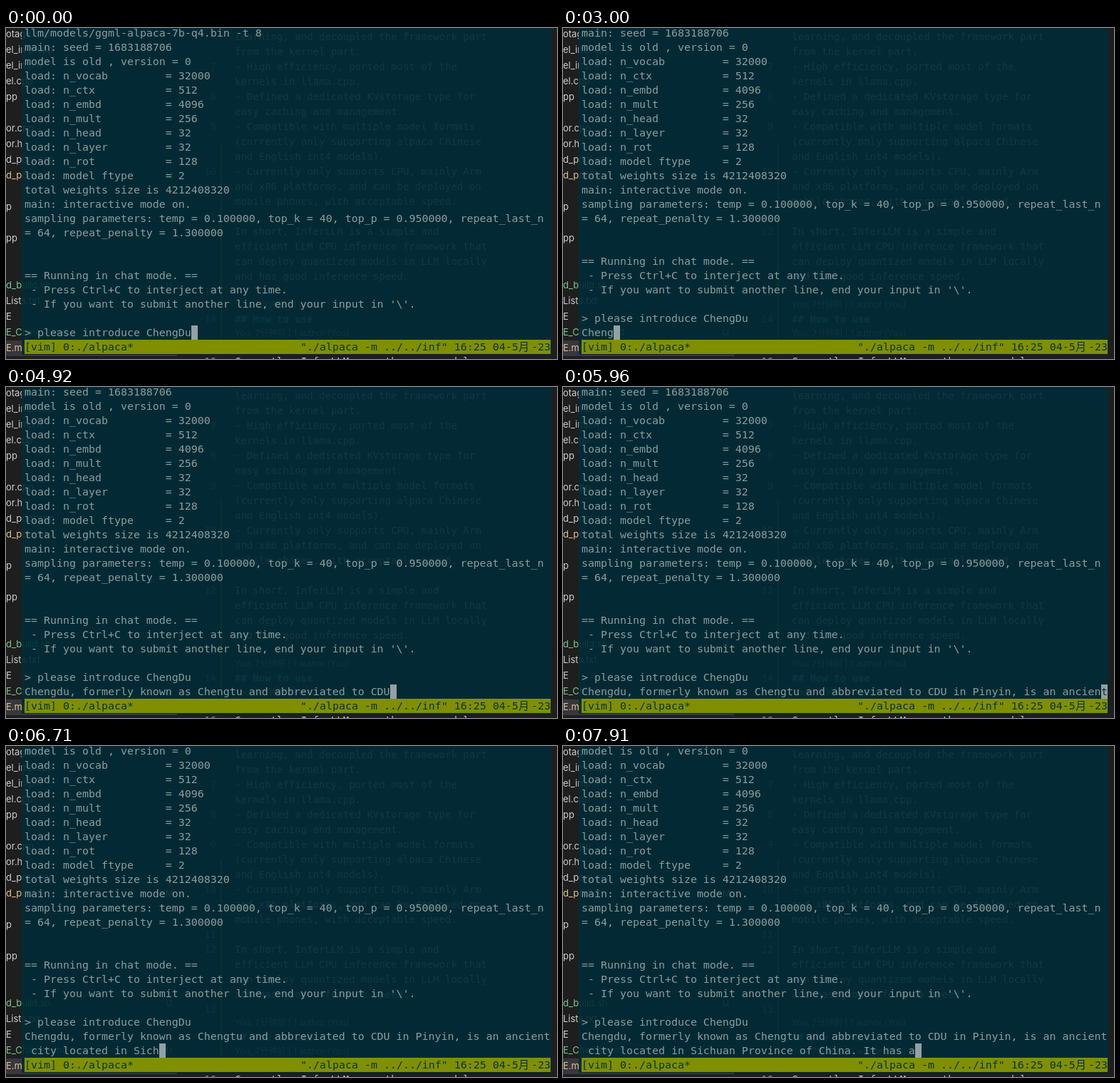
Recreate the animation shown at these times as an HTML page with a canvas. Size 773 px wide and 464 px high, loop 8000 ms.

```html
<!DOCTYPE html>
<html lang="en">
<head>
<meta charset="utf-8">
<style>
html, body { margin: 0; width: 100%; height: 100%; overflow: hidden; background: #1e1e1e; }
canvas { display: block; }
</style>
</head>
<body>
<canvas id="stage" width="773" height="464"></canvas>
<script>
const ctx = document.getElementById("stage").getContext("2d");
const LOOP = 8000, CELL = 9, ROW = 20, LEFT = 26, LAST_TOP = 417, ROWS = 22, COLS = 82;
const MONO = '"DejaVu Sans Mono", monospace';
const SANS = 'Inter, sans-serif';
const TERM_FONT = `14.95px ${MONO}`;
const TEAL = "#002b36", GREY = "#8c9c9c";

const param = (name, value) => `load: ${name}`.padEnd(22) + "= " + value;
const log = [
  "llm/models/ggml-alpaca-7b-q4.bin -t 8",
  "main: seed = 1683188706",
  "model is old , version = 0",
  param("n_vocab", 32000), param("n_ctx", 512), param("n_embd", 4096), param("n_mult", 256),
  param("n_head", 32), param("n_layer", 32), param("n_rot", 128), param("model ftype", 2),
  "total weights size is 4212408320",
  "main: interactive mode on.",
  "sampling parameters: temp = 0.100000, top_k = 40, top_p = 0.950000, repeat_last_n",
  "= 64, repeat_penalty = 1.300000",
  "", "",
  "== Running in chat mode. ==",
  " - Press Ctrl+C to interject at any time.",
  " - If you want to submit another line, end your input in '\\'.",
  "",
  "> please introduce ChengDu"
];

// Bursts of answer tokens: first time, last time, tokens
const bursts = [
  [3000, 4030, "Cheng|du|,| formerly| known| as| Cheng|tu"],
  [4180, 5220, " and| abbrevi|ated| to| C|DU| in| P"],
  [5370, 6410, "inyin|,| is| an| ancient| city| located| in"],
  [6560, 7460, " S|ich|uan| Province| of| China|."],
  [7610, 7910, " It| has| a"]
];
const tokens = bursts.flatMap(([start, end, text]) => {
  const parts = text.split("|");
  const step = (end - start) / (parts.length - 1);
  return parts.map((part, i) => ({ at: start + Math.floor(step * i / 10) * 10, part }));
});

// Editor behind the terminal: baseline-centre y, line number, text
const editorLines = [
  [12, "", "learning, and decoupled the framework part"],
  [33, "", "from the kernel part."],
  [54, 7, "- High efficiency, ported most of the"],
  [75, "", "kernels in llama.cpp."],
  [96, 8, "- Defined a dedicated KVstorage type for"],
  [117, "", "easy caching and management."],
  [138, 9, "- Compatible with multiple model formats"],
  [159, "", "(currently only supporting alpaca Chinese"],
  [180, "", "and English int4 models)."],
  [201, 10, "- Currently only supports CPU, mainly Arm"],
  [222, "", "and x86 platforms, and can be deployed on"],
  [243, "", "mobile phones, with acceptable speed."],
  [264, 11, ""],
  [285, 12, "In short, InferLLM is a simple and"],
  [306, "", "efficient LLM CPU inference framework that"],
  [327, "", "can deploy quantized models in LLM locally"],
  [348, "", "and has good inference speed."],
  [369, 13, ""],
  [467, 16, "Currently, InferLLM uses the same model"]
];
const WHITE = "#cccccc", GREEN = "#73c991", YELLOW = "#e2c08d";
const files = [
  [8, "otage.cpp", WHITE], [30, "el_imp.cpp", WHITE], [52, "el_imp.h", WHITE], [74, "el.cpp", WHITE],
  [96, "pp", WHITE], [140, "or.cpp", WHITE], [162, "or.h", WHITE], [184, "d_pool.cpp", WHITE],
  [206, "d_pool.h", YELLOW, "M"], [250, "p", WHITE], [294, "pp", WHITE],
  [360, "d_build.sh", GREEN, "U"], [382, "Lists.txt", WHITE], [404, "E", WHITE],
  [426, "E_Chinese.md", GREEN, "U"], [448, "E.md", YELLOW, "M"]
];

function box(x, y, w, h, color) {
  ctx.fillStyle = color;
  ctx.fillRect(x, y, w, h);
}

function write(text, x, y, font, color, align = "left") {
  ctx.font = font;
  ctx.fillStyle = color;
  ctx.textAlign = align;
  ctx.fillText(text, x, y);
}

function drawBackdrop() {
  box(0, 0, 773, 464, "#1e1e1e");
  box(0, 438, 240, 22, "#37373d");
  for (const [y, name, color, mark] of files) {
    write(name, 0, y + 5, `13px ${SANS}`, color);
    if (mark) write(mark, 224, y + 5, `12px ${SANS}`, color);
  }
  box(301, 160, 2, 298, "#487e02");
  for (const [y, number, text] of editorLines) {
    write(number, 295, y + 5, `14px ${MONO}`, "#858585", "right");
    write(text, 321, y + 5, `14px ${MONO}`, "#c0c0c0");
  }
  write(14, 295, 413, `14px ${MONO}`, "#858585", "right");
  write("## How to use", 321, 413, `bold 14px ${MONO}`, "#569cd6");
  for (const y of [392, 432])
    write("You, 7分钟前 | 1 author (You)", 321, y, `12px Inter, "Noto Sans CJK SC", sans-serif`, "#999");
  box(22, 0, 743, 458, "rgba(0,43,54,.91)");
}

function drawStatus() {
  box(LEFT, 437, COLS * CELL, ROW, "#808f00");
  const put = (text, col, font = TERM_FONT) => write(text, LEFT + col * CELL, 452, font, "#06333c");
  put("[vim] 0:./alpaca*", 0);
  put('"./alpaca -m ../../inf" 16:25 04-5', 43);
  put("月", 77, '15px "Noto Sans CJK SC", "Noto Sans CJK", sans-serif');
  put("-23", 79);
}

function draw(time) {
  const lines = [...log];
  if (time >= 150) {
    const answer = tokens.filter(token => token.at <= time).map(token => token.part).join("");
    lines.push(answer.slice(0, COLS));
    if (answer.length > COLS) lines.push(answer.slice(COLS));
  }
  drawBackdrop();
  drawStatus();
  const visible = lines.slice(-ROWS);
  visible.forEach((line, i) =>
    write(line, LEFT, LAST_TOP - (ROWS - 1 - i) * ROW + 15, TERM_FONT, GREY));

  const last = visible[ROWS - 1];
  const col = Math.min(last.length, COLS - 1);
  const x = LEFT + col * CELL;
  box(x, LAST_TOP, CELL, ROW, "#93a1a1");
  write(last[col] || "", x, LAST_TOP + 15, TERM_FONT, TEAL);
}

const begin = performance.now();
function frame() {
  draw((performance.now() - begin) % LOOP);
  requestAnimationFrame(frame);
}
frame();
</script>
</body>
</html>
```
